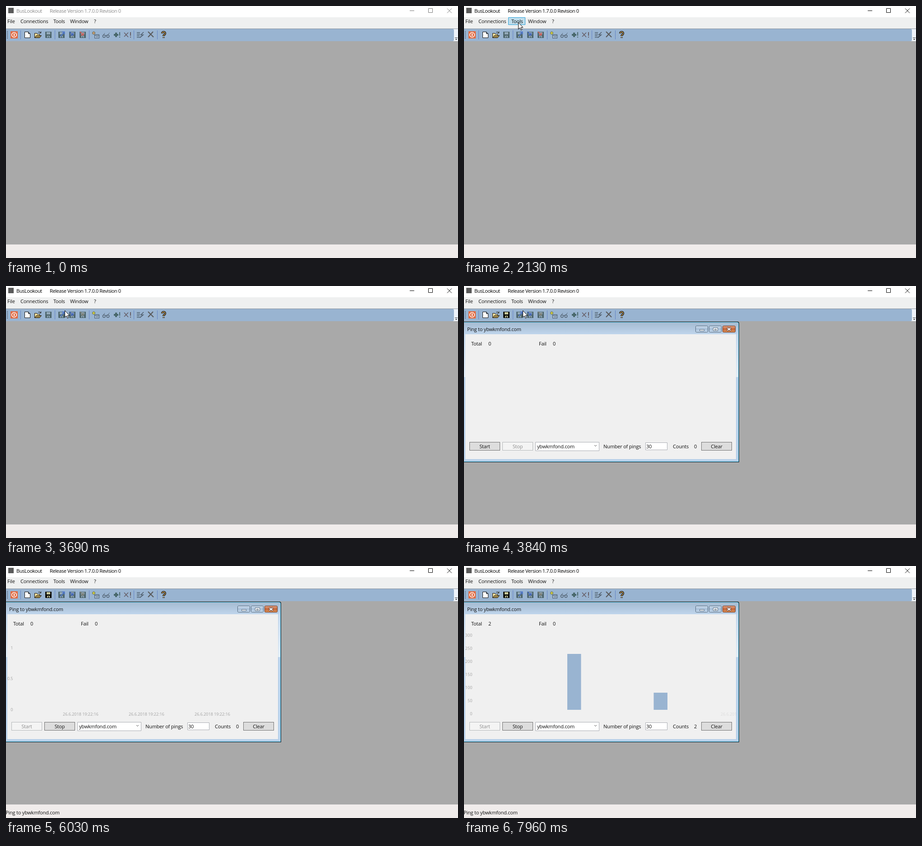
These frames come from a looping animation (1002 px wide and 559 px high, 8000 ms). An HTML page:

```html
<!DOCTYPE html>
<html lang="en">
<head>
<meta charset="utf-8">
<title>Ping window</title>
<style>
html, body { margin: 0; width: 100%; height: 100%; overflow: hidden; background: #a9a9a9; }
svg { display: block; width: 1002px; height: 559px; }
text { font: 11px "Open Sans", "Noto Sans", sans-serif; letter-spacing: -.2px; fill: #111; }
.title { letter-spacing: -.42px; fill: #000; }
.glyph { stroke: #000; fill: none; }
.idle .title { fill: #8c8c8c; }
.idle .glyph { stroke: #777; }
.axis text { font-size: 9px; letter-spacing: 0; fill: #a2a2a2; }
.hover { fill: #26a0da; fill-opacity: .24; stroke: #26a0da; }
.plus { stroke: #e6e23c; }
.idle .plus { stroke: #d9a878; }
.mark { stroke: #7d8078; }
.early .mark { stroke: #d0605a; }
.disk { fill: #50686f; }
.save .disk { fill: #0c0c08; }
.dim .save .disk { fill: #50686f; }
.save .label { fill: #c8c89a; }
.dim .save .label, .label { fill: #93a9b8; }
.btn rect { fill: #ddd; stroke: #707070; }
.btn text { text-anchor: middle; }
.btn.hot rect { fill: #bee6fd; stroke: #3c7fb1; }
.btn.down rect { fill: #c4e5f6; stroke: #2c628b; }
.btn.off rect { fill: #f4f4f4; stroke: #b5b8ba; }
.btn.off text { fill: #8c8c8c; }
</style>
</head>
<body>
<svg id="stage" viewBox="0 0 1002 559">
  <defs>
    <linearGradient id="bar" x2="0" y2="1"><stop stop-color="#a5bbd1"/><stop offset="1" stop-color="#bfd5ec"/></linearGradient>
    <linearGradient id="side" x2="0" y2="1"><stop stop-color="#c3d7ec"/><stop offset="1" stop-color="#e2edf7"/></linearGradient>
    <linearGradient id="knob" x2="0" y2="1"><stop stop-color="#cbdcec"/><stop offset=".5" stop-color="#a9c0d8"/><stop offset="1" stop-color="#c5d9ed"/></linearGradient>
    <linearGradient id="shut" x2="0" y2="1"><stop stop-color="#e0a587"/><stop offset=".5" stop-color="#c4663a"/><stop offset="1" stop-color="#d99258"/></linearGradient>
    <clipPath id="pane"><path d="M3 107H603.5V384H3Z"/></clipPath>
  </defs>

  <path fill="#fff" d="M0 0H1002V25H0Z"/>
  <path fill="#5a5a5a" d="M5 4H17V16H5Z"/>
  <text class="title" x="23" y="15">BusLookout</text>
  <text class="title" x="97" y="15">Release Version 1.7.0.0 Revision 0</text>
  <path class="glyph" d="M895 10.5H905M936.5 5.5H945.5V14.5H936.5ZM978 5.5L988 15.5M988 5.5L978 15.5"/>

  <path fill="#eff0f0" d="M0 25H1002V51H0Z"/>
  <path id="hotConnections" class="hover" d="M26.5 25.5H97.5V41.5H26.5Z"/>
  <path id="hotTools" class="hover" d="M98.5 25.5H135.5V41.5H98.5Z"/>
  <text x="3" y="38">File</text>
  <text x="32" y="38">Connections</text>
  <text x="105" y="38">Tools</text>
  <text x="142" y="38">Window</text>
  <text x="195" y="38">?</text>

  <path fill="#eef3fa" d="M985 51H1002V78H985Z"/>
  <path fill="#99b4d1" d="M0 51H990Q993 51 993 54V75Q993 78 990 78H0Z"/>
  <path stroke="#8d97a2" d="M0 50.5H1002"/>
  <path stroke="#333" fill="#333" d="M995 70.5H1001M996.5 73.5H999.5L998 75Z"/>
  <path stroke="#34465c" stroke-width="2" stroke-dasharray="1 2" d="M3 56V72"/>
  <path stroke="#6484c6" d="M32.5 54V74M108.5 54V74M184.5 54V74M283.5 54V74M335.5 54V74"/>
  <g id="icons" fill="none"></g>

  <path fill="#a9a9a9" d="M0 78H1002V529H0Z"/>
  <path fill="#f0eceb" d="M0 529H1002V559H0Z"/>
  <text id="status" x="-1" y="551">Ping to ybwkmfond.com</text>

  <g id="child">
    <path fill="#0d1b26" d="M0 79H606Q610 79 610 83V391H0Z"/>
    <path fill="#62c8e8" d="M0 80H605Q609 80 609 84V390H0Z"/>
    <path fill="#b9d1ea" d="M0 81H604Q608 81 608 85V389H0Z"/>
    <path fill="url(#bar)" d="M0 81H604Q608 81 608 85V107H0Z"/>
    <path fill="url(#side)" d="M0 107H608V202H0Z"/>
    <path fill="#f0f0f0" d="M3 107H603V384H3Z"/>
    <text x="7" y="100">Ping to ybwkmfond.com</text>
    <g stroke="#53687d">
      <rect x="513.5" y="88.5" width="27" height="14" rx="2" fill="url(#knob)"/>
      <rect x="543.5" y="88.5" width="27" height="14" rx="2" fill="url(#knob)"/>
      <rect x="573.5" y="88.5" width="28" height="14" rx="2" fill="url(#shut)" stroke="#6b3423"/>
      <path fill="#fff" d="M522.5 96.5H532.5V99.5H522.5ZM552.5 92.5H562.5V99.5H552.5ZM555.5 95.5H559.5V97.5H555.5Z"/>
    </g>
    <path stroke="#5a3a35" stroke-width="4" d="M583.5 92.5L591.5 99M591.5 92.5L583.5 99"/>
    <path stroke="#fff" stroke-width="2" d="M584 93L591 98.5M591 93L584 98.5"/>
    <text x="16" y="132">Total</text><text id="total" x="54" y="132"></text>
    <text x="166" y="132">Fail</text><text x="197" y="132">0</text>
    <g class="axis" clip-path="url(#pane)">
      <g id="axisEmpty"></g>
      <g id="axisWide"></g>
      <g id="axisFine"></g>
      <rect id="bar1" width="30.5" fill="#99b4d1"/>
      <rect id="bar2" width="30.5" fill="#99b4d1"/>
      <text id="lateDate" x="569" y="332" style="fill:#dcdcdc">26.6.2018 19:22:17</text>
    </g>
    <g id="start" class="btn"><rect x="12.5" y="346.5" width="67" height="18"/><text x="46" y="360">Start</text></g>
    <g id="stop" class="btn"><rect x="85.5" y="346.5" width="67" height="18"/><text x="119" y="360">Stop</text></g>
    <g class="btn"><rect x="526.5" y="346.5" width="67" height="18"/><text x="560" y="360">Clear</text></g>
    <path fill="#fff" stroke="#abadb3" d="M158.5 346.5H299.5V365.5H158.5ZM402.5 347.5H450.5V363.5H402.5Z"/>
    <path fill="none" stroke="#444" d="M289 353L291.5 355.5L294 353"/>
    <text x="162" y="360">ybwkmfond.com</text>
    <text x="309" y="360">Number of pings</text><text x="404" y="360">30</text>
    <text x="463" y="360">Counts</text><text id="counts" x="510" y="360"></text>
  </g>

  <g id="menu">
    <path fill="#f0f0f0" stroke="#999" d="M99.5 43.5H239.5V85.5H99.5Z"/>
    <path id="hotPing" class="hover" d="M101.5 45.5H236.5V64.5H101.5Z"/>
    <text x="131" y="59">Ping ...</text>
    <text x="131" y="79">Options ...</text>
  </g>
  <path id="pointer" fill="#fff" stroke="#000" d="M.5 .5V15.5L4 12.3L6.3 17.5L8.6 16.5L6.4 11.5H10.8Z"/>
</svg>
<script>
const LOOP = 8000;
const $ = id => document.getElementById(id);
const show = (id, on) => $(id).setAttribute('visibility', on ? 'inherit' : 'hidden');
const set = (id, attrs) => { for (const k in attrs) $(id).setAttribute(k, attrs[k]); };
const line = (d, color, width = 1, more = '') =>
  `<path d="${d}" stroke="${color}" stroke-width="${width}" ${more}/>`;

const floppy = x => `<g transform="translate(${x} 57)"><path class="disk" d="M0 0H14V14H1L0 13Z"/>
  <path class="label" d="M3 1H11V6H3ZM4 9H10V13H8V10H6V13H4Z"/></g>`;

$('icons').innerHTML = `
  <path d="M10 56H26V72H10Z" fill="#e2693f"/>
  <circle cx="18" cy="64" r="5.3" stroke="#fff" stroke-width="1.6"/>` + line('M18 61V67', '#fff', 2) +
  line('M41.5 57.5H49.5L53.5 61.5V70.5H41.5ZM49.5 57.5V61.5H53.5', '#111', 1, 'fill="#fff"') +
  line('M63.5 70.5V60.5H68.5L69.5 62.5H74.5V65.5', '#181208', 1, 'fill="#f0dfa0"') +
  line('M63.5 70.5L67.5 65.5H78.5L74.5 70.5Z', '#181208', 1, 'fill="#a08a4c"') +
  line('M71 59Q74 55.5 77 59.5M77.5 56.5V60H74', '#181208') +
  `<g class="save">${floppy(87)}</g>` +
  floppy(116) + line('M121 67L129 58M124 57.5H129.5V63', '#4d74c4', 2) +
  floppy(140) + line('M141 57L148 64M148.5 59V64.5H143', '#4467bd', 2) +
  floppy(163) + line('M164 57L171 64M171.5 59V64.5H166', '', 2, 'class="mark"') +
  line('M191 60H198M194.5 56.5V63.5', '#5c6350', 3.4) +
  line('M191.5 60H197.5M194.5 57V63', '', 1.7, 'class="plus"') +
  line('M196.5 63.5H206.5V71.5H196.5ZM196 65.5H207M199 68.5H205', '#45576a', 1, 'fill="#a9bfd6"') +
  line('M214.5 66L219 60M224 66L229.5 59.5M220 66Q222 64 224 66', '#4e5e6d') +
  `<g stroke="#4e5e6d" stroke-width="1.3"><circle cx="217.3" cy="67" r="2.8"/><circle cx="226" cy="67" r="2.8"/></g>` +
  line('M239 64H249M244 59V69', '#48686b', 4) +
  line('M252 58V66M252 68V70', '#48686b', 2) +
  line('M262 59L271 69M271 59L262 68', '#665e66', 1.6) +
  line('M276 58V66M276 68V70', '#665e66', 2) +
  line('M290 59H297M290 62.5H297M290 66H296M290 69.5H298', '#52616f', 1.5) +
  line('M305 58L299 64H304L297 70', '#52616f', 1.7) +
  line('M315 57L327 69M326 57L315 69', '#5a5b5c', 2.2) +
  line('M346 61Q346 57.5 349.5 57.5T353 61Q353 63 349.5 65V67M349.5 69V71', '#111', 4) +
  line('M346 61Q346 57.5 349.5 57.5T353 61Q353 63 349.5 65V67M349.5 69V71', '#d6a85c', 1.3);

const tick = (label, right, y) => `<text x="${right}" y="${y}" text-anchor="end">${label}</text>`;
const scale = step => {
  let out = '';
  for (let v = 0; v <= 300; v += step) out += tick(v, 18.3, 330.5 - v * .58);
  return out;
};
$('axisEmpty').innerHTML = tick('1', 15.5, 184.5) + tick('0.5', 15.5, 253) + tick('0', 15.5, 322) +
  [126, 272, 418].map(x => `<text x="${x}" y="332">26.6.2018 19:22:16</text>`).join('');
$('axisWide').innerHTML = scale(100);
$('axisFine').innerHTML = scale(50);

// begin, end, steps, from x, y, to x, y, ease-out power
const moves = [
  [580, 1350, 10, 760, 468, 98, 46, 2.58],
  [1440, 1440, 1, 95, 36, 95, 36, 1],
  [1600, 1900, 4, 98, 36, 120, 36, 1.5],
  [2600, 2690, 1, 123, 38, 127, 39, 1],
  [2910, 3150, 3, 128, 43, 130, 54, 1],
  [4300, 5080, 10, 128, 62, 53, 360, 1.6],
  [5870, 5950, 1, 85, 412, 161, 536, 1]
];

// Progress from 0 to 1, held between the steps.
const stepped = (t, a, b, n) =>
  t >= b ? 1 : t < a ? 0 : Math.floor((t - a) / (b - a) * n) / n;

function pointerAt(t) {
  const m = moves.filter(s => s[0] <= t).pop();
  if (!m || t >= 6030) return null;
  const [a, b, n, x0, y0, x1, y1, power] = m;
  const p = 1 - (1 - stepped(t, a, b, n)) ** power;
  return [x0 + (x1 - x0) * p, y0 + (y1 - y0) * p];
}

function draw(t) {
  const within = (a, b) => t >= a && t < b;
  const stage = $('stage').classList;
  stage.toggle('idle', t < 2130);
  stage.toggle('early', t < 2280);
  stage.toggle('dim', t < 3840);

  const at = pointerAt(t);
  show('pointer', at);
  if (at) set('pointer', { transform: `translate(${at.map(Math.round)})` });

  show('hotConnections', within(1440, 1675));
  show('hotTools', within(1675, 3690));
  show('menu', within(2210, 3690));
  show('hotPing', within(2990, 3690));
  show('child', t >= 3840);
  show('status', t >= 4300);

  const over = at && at[0] >= 12 && at[0] < 80 && at[1] >= 346 && at[1] < 365;
  const running = t >= 5400;
  $('start').classList.toggle('hot', !!over && t < 5250);
  $('start').classList.toggle('down', within(5250, 5400));
  $('start').classList.toggle('off', running);
  $('stop').classList.toggle('off', !running);

  const count = t < 6640 ? 0 : t < 7580 ? 1 : 2;
  $('total').textContent = $('counts').textContent = count;

  show('axisEmpty', within(4150, 7030));
  show('axisWide', within(7030, 7900));
  show('axisFine', t >= 7900);
  show('lateDate', t >= 7960);

  const rise = t < 7030 ? 0 : .25 + .75 * stepped(t, 7030, 7250, 3);
  const shift = t < 7900 ? 0 : t < 7960 ? .5 : 1;
  set('bar1', { x: 297 - 68 * shift, y: 319 - 124 * rise, height: 124 * rise });
  set('bar2', { x: 420.5, y: 319 - 38 * shift, height: 38 * shift });
}

const begin = performance.now();
function frame() {
  draw((performance.now() - begin) % LOOP);
  requestAnimationFrame(frame);
}
frame();
</script>
</body>
</html>
```
